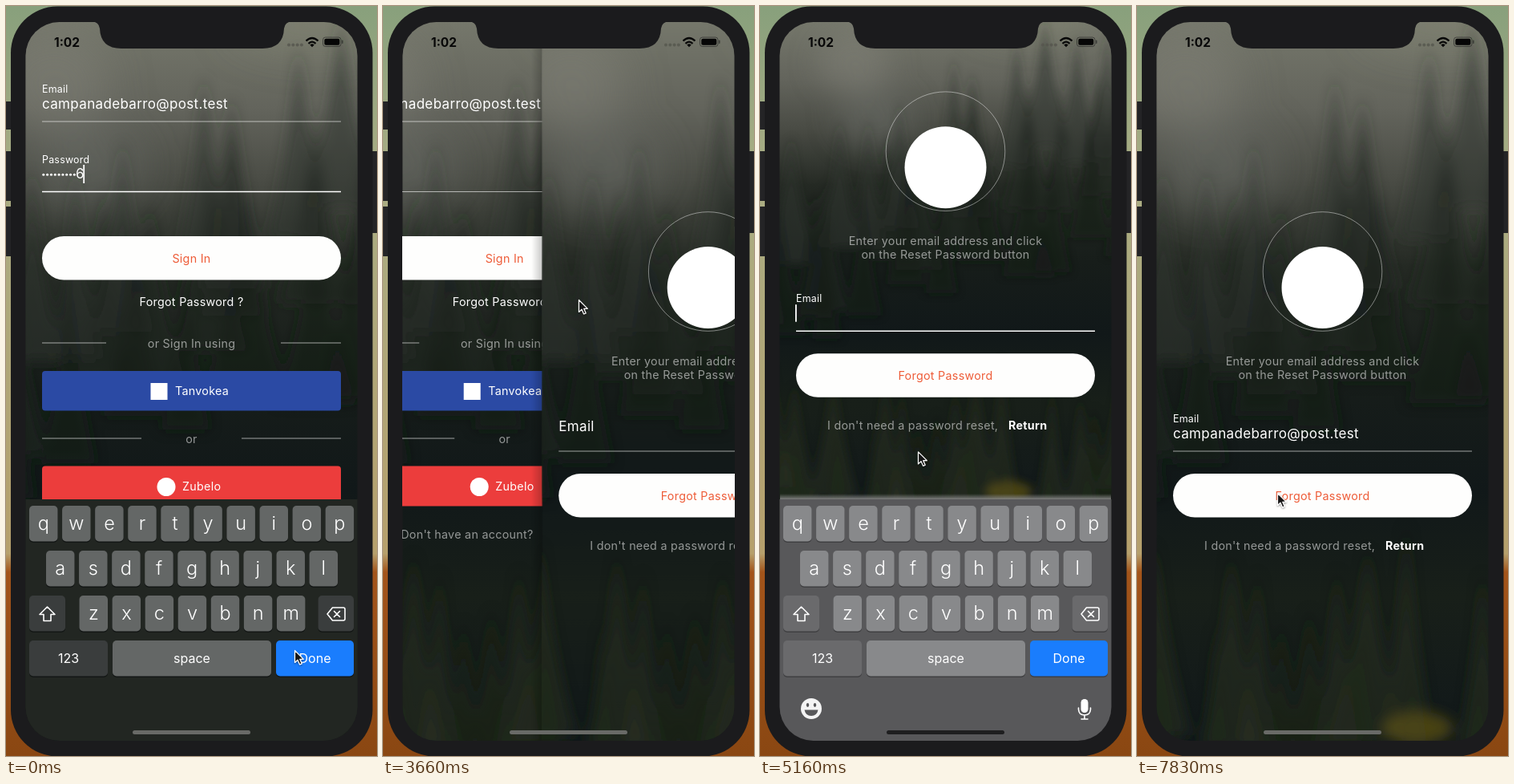
An HTML page that plays this animation: 463 by 935 pixels, repeating every 8000 ms.

```html
<!DOCTYPE html>
<html lang="en">
<head>
<meta charset="utf-8">
<title>Password reset flow</title>
<style>
html, body { margin: 0; width: 100%; height: 100%; overflow: hidden; background: #1b1b1d; }
svg { display: block; width: 463px; height: 935px; }
text { font: 400 14.3px Inter, "Open Sans", sans-serif; letter-spacing: .02em; fill: #fff; white-space: pre; }
.mid { text-anchor: middle; }
.dim { fill: rgba(255,255,255,.55); }
.bold { font-weight: 700; }
.cta { fill: #ee5c38; }
.small { font-size: 12.4px; }
.value { font-size: 17px; }
.clock { font-size: 15.5px; font-weight: 700; letter-spacing: 0; fill: #080808; }
.rule { stroke: #fff; stroke-opacity: .6; }
.rule.on { stroke-opacity: 1; stroke-width: 1.4; }
#keys { --bg: #222622; --key: #646766; --fn: #3a3d3d; --edge: #131615; }
#keys.light { --bg: #58585a; --key: #88898b; --fn: #6a6a6c; --edge: #3f3f41; }
#keys .bg { fill: var(--bg); }
#keys .key { fill: var(--key); }
#keys .fn { fill: var(--fn); }
#keys .edge { fill: var(--edge); }
#keys .done { fill: #1a7dfd; }
#keys:not(.light) .tools { display: none; }
#keys text { font-size: 16px; letter-spacing: 0; text-anchor: middle; }
#keys .letter { font-size: 23.5px; font-weight: 300; }
.icon { fill: none; stroke: #fff; stroke-width: 1.6; stroke-linejoin: round; stroke-linecap: round; }
</style>
</head>
<body>
<svg id="stage" viewBox="0 0 463 935" xmlns="http://www.w3.org/2000/svg"></svg>
<script>
const MAIL = 'campanadebarro@post.test';
const STEP = 500 / 3, STEPS = 48;
const BODY = '#1b1b1d';

// ---- drawing helpers ----
const range = n => [...Array(n).keys()];
const text = (x, y, s, cls = '', attr = '') => `<text x="${x}" y="${y}" class="${cls}" ${attr}>${s}</text>`;
const box = (x, y, w, h, r, attr = '') =>
  `<rect x="${x}" y="${y}" width="${w}" height="${h}" rx="${r}" ${attr}/>`;
const rule = (x1, x2, y, attr = '') =>
  `<line class="rule" x1="${x1}" x2="${x2}" y1="${y}" y2="${y}" ${attr}/>`;
const oval = (x, y, rx, ry, fill, o = 1) =>
  `<ellipse cx="${x}" cy="${y}" rx="${rx}" ry="${ry}" fill="${fill}" opacity="${o}"/>`;
const ramp = (id, stops, attr = 'x2="0" y2="1"') =>
  `<linearGradient id="${id}" ${attr}>${stops.map(([o, c, a = 1]) =>
    `<stop offset="${o}" stop-color="${c}" stop-opacity="${a}"/>`).join('')}</linearGradient>`;

let seed = 11;
const random = () => (seed = seed * 16807 % 2147483647) / 2147483647;
const jitter = d => (random() * 2 - 1) * d;

// One row of blurred firs; the tops climb to the right by the slope.
const firs = (top, slope, fill) => range(11).map(i => {
  const x = -100 + i * 66 + jitter(26), w = 38 + jitter(12);
  const y = top + (231 - x) * slope + jitter(40);
  return `<path d="M${x} ${y}Q${x + w * .3} ${y + 130} ${x + w} ${y + 240}H${x - w}Q${x - w * .3} ${y + 130} ${x} ${y}" fill="${fill}" opacity=".55"/>`;
}).join('');

// The photo is wider than the screen, since the form can shrink it.
const forest = () => box(-90, 20, 643, 896, 0, 'fill="url(#air)"') +
  '<g filter="url(#soft)">' + oval(60, 95, 70, 60, '#85867c', .45) + oval(100, 200, 75, 60, '#6b6c66', .5) +
  oval(390, 25, 110, 30, '#8a8c78', .4) + '</g><g filter="url(#blur)">' +
  firs(125, .4, '#31352f') + firs(205, .4, '#212721') + firs(280, .3, '#161d19') +
  firs(680, 0, '#2a3220') + firs(760, 0, '#1f271b') + oval(350, 900, 44, 20, '#5a5016', .75) + '</g>';
const photo = id => `<g clip-path="url(#sheet)"><use href="#forest" id="${id}"/></g>`;

const pill = (y, label) =>
  box(45, y, 373, 54.5, 27.2, 'fill="#fefefd"') + text(231.5, y + 32.5, label, 'mid cta');

const signIn = () =>
  text(45, 108, 'Email', 'small') + text(45, 127.5, MAIL, 'value') + rule(45, 418, 144) +
  text(45, 195.5, 'Password', 'small') +
  range(10).map(i => `<g id="dot${i}">${oval(46.8 + i * 4.82, 210.3, 1.5, 1.5, '#fff')}</g>`).join('') +
  text(87, 215, '6', 'value', 'id="digit"') +
  box(96.3, 198, 1.8, 23, 0, 'fill="#fff" id="caret1"') + rule(45, 418, 231.5, 'id="rule1"') +
  pill(287, 'Sign In') + text(231.5, 374, 'Forgot Password ?', 'mid') +
  rule(45, 125, 420) + text(231.5, 426, 'or Sign In using', 'mid dim') + rule(343, 418, 420) +
  box(45, 455, 373, 49.5, 4, 'fill="#2b4aa4"') + box(180.5, 470, 21, 21, 0, 'fill="#fff"') +
  text(211, 485, 'Tanvokea') +
  rule(45, 169, 539) + text(231.5, 545, 'or', 'mid dim') + rule(294, 418, 539) +
  box(45, 573.5, 373, 50, 4, 'fill="#ec3d3c"') + oval(200, 599.5, 11.5, 11.5, '#fff') +
  text(220, 604, 'Zubelo') +
  text(102, 664, "Don't have an account?", 'dim') + text(287, 664, 'Sign Up', 'bold');

const reset = () =>
  '<circle cx="231.5" cy="331" r="74.3" fill="none" stroke="#fff" stroke-opacity=".45"/>' +
  oval(231.5, 351, 51, 51, '#fff') +
  text(231.5, 448, 'Enter your email address and click', 'mid dim') +
  text(231.5, 465, 'on the Reset Password button', 'mid dim') +
  text(45, 530, 'Email', '', 'id="label"') + text(45, 538.5, '', 'value', 'id="mail"') +
  box(44, 522, 1.8, 21.5, 0, 'fill="#fff" id="caret2"') + rule(45, 418, 555, 'id="rule2"') +
  pill(583, 'Forgot Password') +
  text(84, 678, "I don't need a password reset,", 'dim') + text(310, 678, 'Return', 'bold');

function keyboard() {
  const cap = (x, y, w, cls) =>
    box(x, y + 1, w, 45, 5, 'class="edge"') + box(x, y, w, 44.5, 5, `class="${cls}"`);
  const row = (letters, x0, y) => [...letters].map((c, i) => {
    const x = x0 + i * 41.07;
    return cap(x, y, 35.5, 'key') + text(x + 17.8, y + 29.5, c, 'letter');
  }).join('');
  return box(25, 608, 413, 7, 0, 'class="tools" fill="url(#glow)"') +
    box(24, 615, 415, 340, 0, 'class="bg"') +
    row('qwertyuiop', 29, 623) + row('asdfghjkl', 50, 679) + row('zxcvbnm', 91.5, 735) +
    cap(29, 735, 45, 'fn') + cap(389.5, 735, 44.5, 'fn') +
    cap(29, 791, 98, 'fn') + cap(133, 791, 198, 'key') + cap(337, 791, 97, 'done') +
    text(78, 819, '123') + text(232, 818.5, 'space') + text(385.5, 818.5, 'Done') +
    '<path class="icon" d="M51.5 749L42 758.5H47V766.5H56V758.5H61Z"/>' +
    '<path class="icon" d="M407.5 750H421Q423 750 423 752V764Q423 766 421 766H407.5L401 758ZM409.5 754.5L416.5 761.5M416.5 754.5L409.5 761.5"/>' +
    '<g class="tools">' + oval(64, 876, 13, 13, '#f4f4f4') +
    oval(59.5, 871.5, 1.7, 2.4, '#58585a') + oval(68.5, 871.5, 1.7, 2.4, '#58585a') +
    '<path d="M55.5 877.5H72.5Q71 885 64 885T55.5 877.5Z" fill="#58585a"/>' +
    box(400.5, 864, 9, 17, 4.5, 'fill="#fff"') +
    '<path class="icon" d="M397.5 875V877Q398 884 405 884T412.5 877V875M405 884V889M401 889H409"/></g>';
}

const status = () => text(60, 50.5, '1:02', 'clock') +
  range(4).map(i => oval(353 + i * 5.3, 48.5, 2, 2, '#55564e', .8)).join('') +
  '<path fill="none" stroke="#080808" stroke-width="2.3" d="M374.5 43.5Q382 36.5 389.5 43.5M377.5 46.8Q382 42.5 386.5 46.8"/>' +
  '<path d="M379.3 48.5Q382 46 384.7 48.5L382 51.3Z" fill="#080808"/>' +
  box(395.5, 39, 22.5, 11.5, 3.2, 'fill="none" stroke="#222" stroke-opacity=".6"') +
  box(397.3, 40.8, 19, 8, 2, 'fill="#060606"') +
  box(419, 42.5, 1.6, 4.5, .8, 'fill="#222" fill-opacity=".6"');

const button = (x, y, h) => box(x, y, 12, h, 2, 'fill="#242426"');

document.getElementById('stage').innerHTML = `<defs>
  ${ramp('wall', [[0, '#88a07c'], [.22, '#a9ad84'], [.73, '#b6a06c'], [.755, '#a3541a'], [1, '#8a4712']])}
  ${ramp('air', [[0, '#75776b'], [.12, '#63645c'], [.22, '#4a4c45'], [.34, '#252a24'], [.5, '#171d1a'],
    [.65, '#111819'], [.8, '#181f19'], [1, '#11181a']])}
  ${ramp('shade', [[0, '#000', 0], [1, '#000', .22]], 'x2="1" y2="0"')}
  ${ramp('glow', [[0, '#888', 0], [1, '#888', .9]])}
  <filter id="soft" x="-30%" y="-30%" width="160%" height="160%"><feGaussianBlur stdDeviation="26"/></filter>
  <filter id="blur" x="-10%" y="-10%" width="120%" height="120%"><feGaussianBlur stdDeviation="8"/></filter>
  <filter id="drop" x="-50%" y="-50%" width="220%" height="220%"><feDropShadow dx="0" dy="1" stdDeviation="1" flood-opacity=".45"/></filter>
  <clipPath id="sheet">${box(24.5, 20, 414, 896, 0)}</clipPath>
  <clipPath id="screen">${box(24.5, 20, 414, 896, 42)}</clipPath>
  <g id="forest">${forest()}</g>
</defs>
${box(0, 0, 463, 935, 0, 'fill="url(#wall)"')}
${button(-3, 119, 35) + button(-3, 181, 62) + button(-3, 250, 62) + button(454, 181, 102)}
${box(6, .5, 451.5, 935, 58, `fill="${BODY}"`)}
<g clip-path="url(#screen)">
  <g id="page1">${photo('photo1')}${signIn()}</g>
  <g id="page2">${box(11, 20, 14, 896, 0, 'fill="url(#shade)" id="edge"')}${photo('photo2')}
    <g id="form">${reset()}</g></g>
  <g id="keys">${keyboard()}</g>
  ${status()}
  ${box(158, 903, 147, 5, 2.5, 'id="home"')}
</g>
<path fill="${BODY}" d="M107 19Q116 20 117 28Q118 53 144 53H320Q346 53 347 28Q348 20 357 19Z"/>
<path id="pointer" filter="url(#drop)" fill="#161616" stroke="#fff" stroke-width="1.2" stroke-linejoin="round"
  d="M.5 .5V15.5L4 12.2L6.6 18L9.2 16.9L6.7 11.3H11.3Z"/>`;

// ---- motion, counted in steps ----
const clamp = u => Math.min(1, Math.max(0, u));
const ease = (k, from, span = 2.4) => 1 - (1 - clamp((k - from) / span)) ** 3;

// Where the pointer turns or rests: [step, x, y]
const stops = [[3, 360, 803], [7, 308, 721], [9, 307, 720], [13, 307, 699], [14, 307, 699], [15, 296, 635],
  [18, 213, 400], [20, 244, 366], [23, 244, 366], [27, 170, 521], [30, 170, 521], [38, 386, 796],
  [39, 386, 796], [42, 307, 606], [47, 175, 607]];

function pointerAt(k) {
  const i = Math.max(1, stops.findIndex(s => s[0] >= k));
  const [k0, x0, y0] = stops[i - 1], [k1, x1, y1] = stops[i];
  const u = clamp((k - k0) / (k1 - k0));
  return [x0 + (x1 - x0) * u, y0 + (y1 - y0) * u];
}

const $ = id => document.getElementById(id);
const move = (id, x, y) => $(id).setAttribute('transform', `translate(${x} ${y})`);
const show = (id, on) => { $(id).style.display = on ? '' : 'none'; };

function pose(k) {
  move('pointer', ...pointerAt(k));

  // password field
  show('digit', k < 1);
  show('dot9', k >= 1);
  show('caret1', k < 2);
  $('rule1').classList.toggle('on', k < 2);

  // page push
  const push = ease(k, 21, 4);
  move('page1', -138 * push, 0);
  move('page2', 413 * (1 - push), 0);
  show('page1', push < 1);
  show('page2', push > 0);
  show('edge', push < 1);

  // the second keyboard makes the reset page shorter, so its photo shrinks
  const closing = ease(k, 39), squeeze = ease(k, 29) - closing;
  const light = squeeze > .5, scale = 1 - squeeze * 301 / 896;
  move('form', 0, -150.5 * squeeze);
  $('photo2').setAttribute('transform', `translate(231.5 20) scale(${scale}) translate(-231.5 -20)`);
  move('keys', 0, 320 * (ease(k, 1) - ease(k, 28) + closing));
  $('keys').classList.toggle('light', light);
  $('home').setAttribute('fill', light ? '#1f1f20' : '#696a67');

  // email field
  const focused = k >= 29 && k < 40, float = ease(k, 28.95);
  $('label').style.fontSize = 17 - 4.6 * float + 'px';
  $('label').setAttribute('y', 530 - 11.5 * float);
  $('mail').textContent = MAIL.slice(0, Math.round(MAIL.length * clamp((k - 31) / 6)));
  $('caret2').setAttribute('x', 44 + $('mail').getComputedTextLength());
  show('caret2', focused);
  $('rule2').classList.toggle('on', focused && k > 29);
}

let last = -1;
const start = performance.now();
function tick() {
  const t = (performance.now() - start) % 8000;
  const k = Math.floor((t + 8) / STEP) % STEPS;
  if (k !== last) pose(last = k);
  requestAnimationFrame(tick);
}
tick();
</script>
</body>
</html>
```
